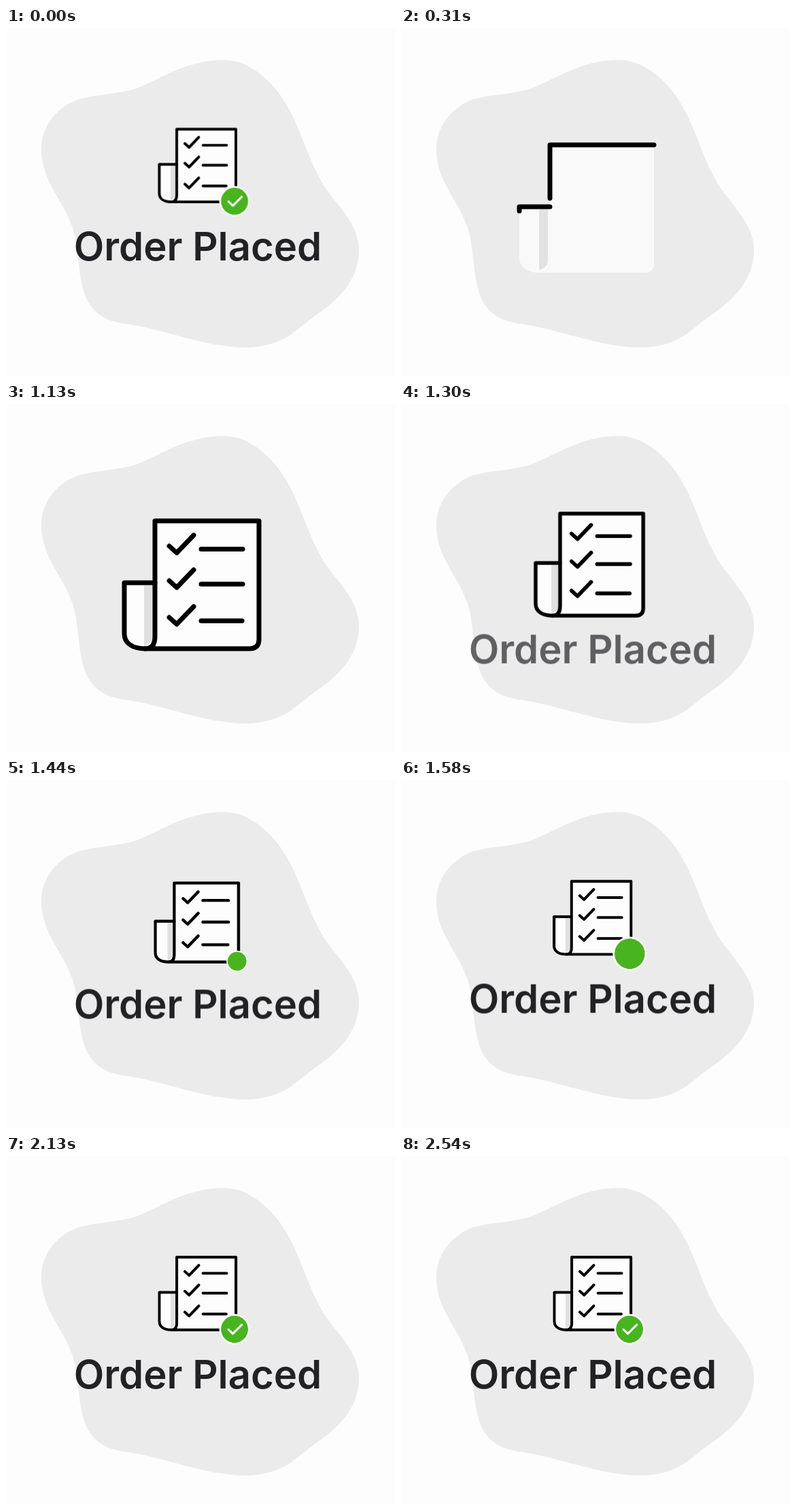
Recreate the animation shown at these times as an HTML page. Size 572 by 512 pixels, loop 2580 ms.

```html
<!DOCTYPE html>
<html lang="en">
<head>
<meta charset="utf-8">
<title>Order Placed</title>
<style>
html, body { margin: 0; width: 100%; height: 100%; overflow: hidden; background: #fdfdfd; }
svg { display: block; width: 572px; height: 512px; }

/* The loop opens on its last 30 ms, then restarts from empty. */
.page, .shrink, .badge, .label, .line {
  animation: 2580ms cubic-bezier(.33, 0, .67, 1) -2550ms infinite;
}
.line {
  fill: none; stroke: #000; stroke-width: 7;
  stroke-linecap: round; stroke-linejoin: round;
  stroke-dasharray: 1 2;
  --hide: 1.1;
}
.page { fill: #fdfdfd; animation-name: page; }
.shade { fill: #e0e0e0; }
.outline { --hide: 1.02; animation-name: outline; }
.curl { --hide: 1.04; animation-name: curl; }
.row1 { animation-name: row1; }
.row2 { animation-name: row2; }
.row3 { animation-name: row3; }
.tick { --hide: 1.08; stroke: #fdfdfd; stroke-width: 5.5; animation-name: tick; }

.shrink { animation-name: shrink; animation-timing-function: cubic-bezier(.4, 0, .2, 1); }
.badge { transform-origin: 368.5px 358.4px; animation-name: badge; }
.label {
  font: 600 58px Inter, "Open Sans", sans-serif;
  text-anchor: middle; fill: #222224;
  animation-name: rise, fade;
  animation-timing-function: cubic-bezier(.4, 0, .2, 1), linear;
}

@keyframes page { 0%, 2.7% { opacity: 0 } 14.3%, 100% { opacity: 1 } }
@keyframes outline { 0%, .4% { stroke-dashoffset: var(--hide) } 27%, 100% { stroke-dashoffset: 0 } }
@keyframes curl { 0%, 4.7% { stroke-dashoffset: var(--hide) } 20.5%, 100% { stroke-dashoffset: 0 } }
@keyframes row1 { 0%, 17.2% { stroke-dashoffset: var(--hide) } 27.3%, 100% { stroke-dashoffset: 0 } }
@keyframes row2 { 0%, 23.3% { stroke-dashoffset: var(--hide) } 33.3%, 100% { stroke-dashoffset: 0 } }
@keyframes row3 { 0%, 29.1% { stroke-dashoffset: var(--hide) } 39.1%, 100% { stroke-dashoffset: 0 } }
@keyframes tick { 0%, 58.9% { stroke-dashoffset: var(--hide) } 69%, 100% { stroke-dashoffset: 0 } }
@keyframes shrink {
  0%, 42.64% { transform: translate(0, 0) scale(1) }
  62.3%, 100% { transform: translate(126.5px, 51.1px) scale(.5686) }
}
@keyframes badge {
  0%, 51.9% { transform: scale(0); animation-timing-function: cubic-bezier(.3, .4, .6, 1) }
  58.9% { transform: scale(1.13) }
  64.3%, 100% { transform: scale(1) }
}
@keyframes rise { 0%, 42.64% { transform: translateY(74px) } 62.3%, 100% { transform: translateY(0) } }
@keyframes fade { 0%, 43% { opacity: 0 } 52%, 100% { opacity: 1 } }
</style>
</head>
<body>
<svg viewBox="0 0 572 512">
  <path fill="#ebebec" d="M320 47C362 47 398 84 417 121C438 160 447 203 473 240C494 268 519 293 519 327C519 375 482 405 451 426C424 446 406 470 350 470C296 470 240 446 187 437C170 434 151 433 135 420C104 393 111 352 101 305C90 257 52 230 52 178C52 145 74 117 106 105C132 98 156 98 185 91C222 80 260 47 320 47Z"/>
  <g class="shrink">
    <g class="page">
      <path d="M219 263H174V338C174 352 186 360 205 360Q219 360 219 342Z"/>
      <path class="shade" d="M203 267H216V342Q216 352 203 356Z"/>
      <path d="M219 172H372V346Q372 360 358 360H205Q219 360 219 342Z"/>
    </g>
    <path class="line curl" pathLength="1" d="M219 263H174V338C174 352 186 360 205 360"/>
    <path class="line outline" pathLength="1" d="M372 172H219V342Q219 360 205 360H358Q372 360 372 346V172"/>
    <path class="line row1" pathLength="1" d="M240 209L251 219L276 193"/>
    <path class="line row1" pathLength="1" d="M287 213.5H348"/>
    <path class="line row2" pathLength="1" d="M240 260L251 270L276 244"/>
    <path class="line row2" pathLength="1" d="M287 265H348"/>
    <path class="line row3" pathLength="1" d="M240 314L251 324L276 298"/>
    <path class="line row3" pathLength="1" d="M287 319H347"/>
    <g class="badge">
      <circle cx="368.5" cy="358.4" r="39.5" fill="#fdfdfd"/>
      <circle cx="368.5" cy="358.4" r="35" fill="#48b41e"/>
    </g>
    <path class="line tick" pathLength="1" d="M352.6 358.9L364 370L387 347"/>
  </g>
  <text class="label" x="282" y="342">Order Placed</text>
</svg>
</body>
</html>
```
